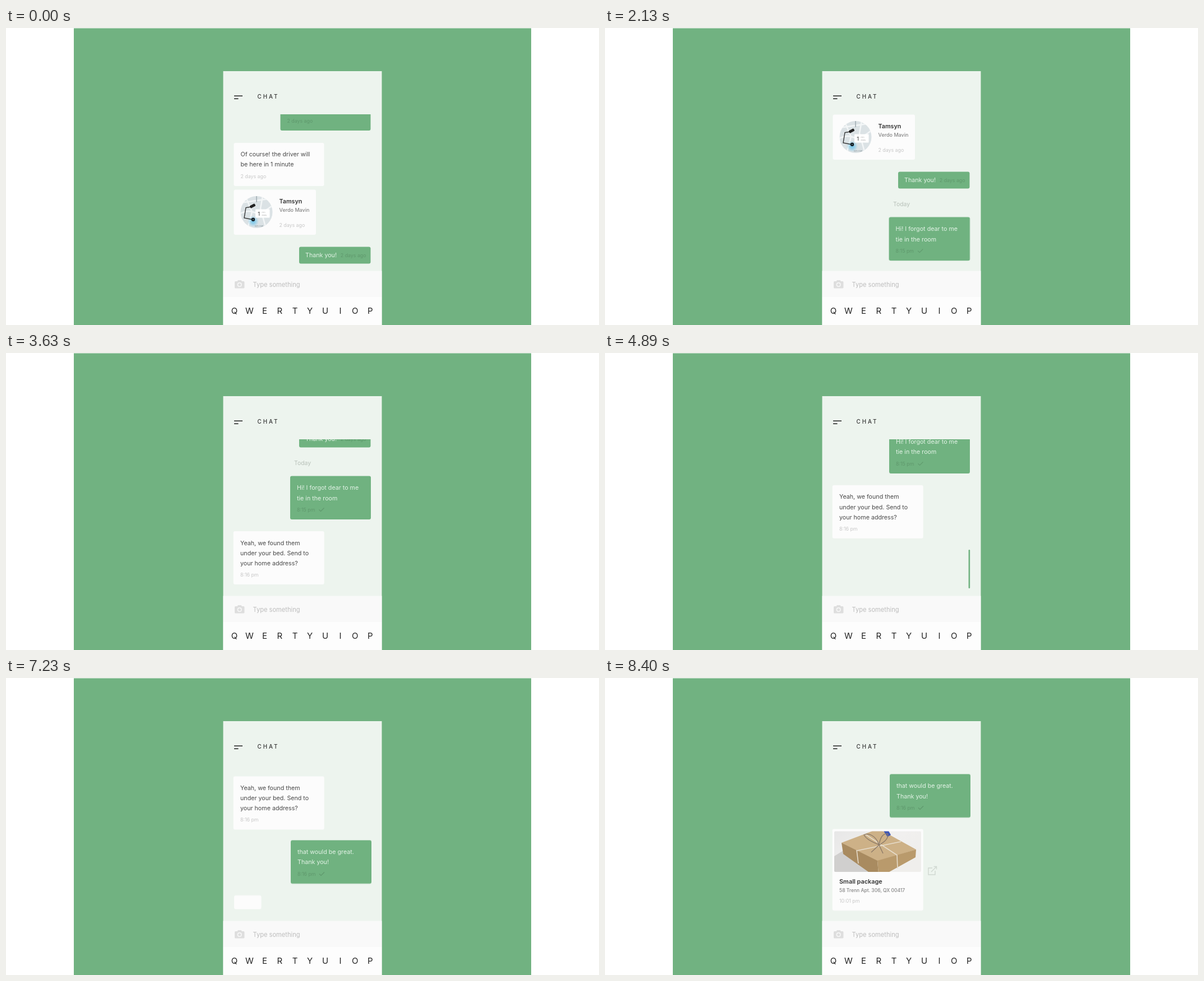
Write an HTML page that moves like this. It is 1058x530 px and loops after 9.39 s.

```html
<!DOCTYPE html>
<html lang="en">
<head>
<meta charset="utf-8">
<title>Chat</title>
<style>
html, body { margin: 0; width: 100%; height: 100%; overflow: hidden; background: #fff; }
svg { display: block; width: 100%; height: 100%; font: 10.7px Inter, "Open Sans", sans-serif; }
.green { fill: #70b280; }
.white { fill: #fcfcfc; }
.body { fill: #484848; }
.light { fill: #e3f3e6; }
.bold { fill: #333; font-weight: 600; }
.sub { fill: #858585; font-size: 9px; font-weight: 500; }
.time { fill: #c8c8c8; font-size: 8.8px; }
.sent { fill: #5f986c; font-size: 8.8px; }
.tick { fill: none; stroke: #5f986c; stroke-width: 1.1; }
.today { fill: #b8c1b9; font-size: 10.4px; }
.keys { fill: #222; font-size: 15px; text-anchor: middle; }

/* One shared 9390 ms loop; percentages are milliseconds / 93.9 */
.feed, .blob, .shift, .grow, .fade, .reply { animation: 9390ms linear infinite; }
.feed { animation-name: scroll; animation-timing-function: cubic-bezier(.65, 0, .35, 1); }
@keyframes scroll {
  0%, 12.705% { transform: translateY(0); }
  16.699% { transform: translateY(-104px); }
  20.692%, 24.601% { transform: translateY(-134px); }
  28.435%, 33.546% { transform: translateY(-178.5px); }
  37.7%, 49.361% { transform: translateY(-252px); }
  53.355%, 69.01% { transform: translateY(-346.5px); }
  72.843%, 76.997% { transform: translateY(-394.5px); }
  80.99%, 100% { transform: translateY(-512.5px); }
}

/* The send dot swells, rises and narrows to a bar */
.blob { fill: #70b280; animation-timing-function: ease-in-out; }
.blob.one { animation-name: blob-one; }
.blob.two { animation-name: blob-two; }
@keyframes blob-one {
  0%, 5.112% { x: 650px; y: 457px; width: 0; height: 0; rx: 16px; opacity: 1; }
  8.307%, 11.715% { x: 634px; y: 441px; width: 32px; height: 32px; rx: 16px; }
  15.335% { x: 647.7px; y: 361px; width: 4.3px; height: 66px; rx: 2px; }
  15.655% { x: 648.6px; y: 353px; width: 2.6px; height: 69px; rx: 1.3px; opacity: 1; }
  15.656%, 100% { x: 648.6px; y: 353px; width: 2.6px; height: 69px; rx: 1.3px; opacity: 0; }
}
@keyframes blob-two {
  0%, 43.131% { x: 650px; y: 457px; width: 0; height: 0; rx: 16px; opacity: 1; }
  46.326%, 48.3% { x: 634px; y: 441px; width: 32px; height: 32px; rx: 16px; }
  52.077% { x: 648.6px; y: 351px; width: 2.6px; height: 69px; rx: 1.3px; }
  52.236% { x: 648.6px; y: 350px; width: 2.6px; height: 69px; rx: 1.3px; opacity: 1; }
  52.237%, 100% { x: 648.6px; y: 350px; width: 2.6px; height: 69px; rx: 1.3px; opacity: 0; }
}

/* The first sent bubble makes room for the date label */
.shift { animation-name: shift; animation-timing-function: cubic-bezier(.65, 0, .35, 1); }
@keyframes shift {
  0%, 16.699% { transform: translateY(-30px); }
  20.692%, 100% { transform: translateY(0); }
}

.grow { animation-timing-function: ease-in-out; }
.grow.one { transform-origin: 650px 510px; animation-name: grow-one; }
.grow.two { transform-origin: 650px 722.7px; animation-name: grow-two; }
@keyframes grow-one {
  0%, 15.655% { transform: scale(0); }
  15.656% { transform: scale(.018, .89); }
  17.785% { transform: scale(1.076, 1.06); }
  19.915% { transform: scale(.985, .99); }
  22.045% { transform: scale(1.004); }
  23.802%, 100% { transform: none; }
}
@keyframes grow-two {
  0%, 52.236% { transform: scale(0); }
  52.237% { transform: scale(.018, .89); }
  54.366% { transform: scale(1.076, 1.06); }
  56.496% { transform: scale(.985, .99); }
  58.626% { transform: scale(1.004); }
  60.383%, 100% { transform: none; }
}

/* A small typing bubble opens into the full reply */
.reply { animation-timing-function: cubic-bezier(.65, 0, .35, 1); }
.reply.one { animation-name: reply-one; }
.reply.two { animation-name: reply-two; }
@keyframes reply-one {
  0%, 24.601% { x: 407px; y: 569px; width: 48.5px; height: 24.5px; opacity: 0; }
  28.435%, 33.546% { x: 407px; y: 569px; width: 48.5px; height: 24.5px; opacity: 1; }
  37.7%, 100% { x: 405.7px; y: 570px; width: 162px; height: 95px; opacity: 1; }
}
@keyframes reply-two {
  0%, 69.01% { x: 407px; y: 782.5px; width: 48.5px; height: 24.5px; opacity: 0; }
  72.843%, 76.997% { x: 407px; y: 782.5px; width: 48.5px; height: 24.5px; opacity: 1; }
  80.99%, 100% { x: 405.7px; y: 782px; width: 162px; height: 145.5px; opacity: 1; }
}

.f-date { animation-name: f-date; }
.f-hi { animation-name: f-hi; }
.f-yeah { animation-name: f-yeah; }
.f-great { animation-name: f-great; }
.f-parcel { animation-name: f-parcel; }
.f-share { animation-name: f-share; }
@keyframes f-date { 0%, 17.57% { opacity: 0; } 20.692%, 100% { opacity: 1; } }
@keyframes f-hi { 0%, 17.25% { opacity: 0; } 19.7%, 100% { opacity: 1; } }
@keyframes f-yeah { 0%, 35.2% { opacity: 0; } 38.4%, 100% { opacity: 1; } }
@keyframes f-great { 0%, 53.83% { opacity: 0; } 56.28%, 100% { opacity: 1; } }
@keyframes f-parcel { 0%, 79.4% { opacity: 0; } 85%, 100% { opacity: 1; } }
@keyframes f-share { 0%, 83% { opacity: 0; } 86.9%, 100% { opacity: 1; } }
</style>
</head>
<body>
<svg viewBox="0 0 1058 530">
  <defs>
    <clipPath id="feedArea"><rect x="387" y="154" width="284" height="279.5"/></clipPath>
    <clipPath id="mapArea"><circle cx="447" cy="328.5" r="28.5"/></clipPath>
    <clipPath id="photoArea"><rect x="409" y="273.5" width="155" height="72.5" rx="2"/></clipPath>
    <linearGradient id="studio" x2="1" y2=".6">
      <stop stop-color="#e7e7e7"/><stop offset=".55" stop-color="#f1f0ef"/><stop offset="1" stop-color="#efeeec"/>
    </linearGradient>
    <radialGradient id="glow"><stop stop-color="#6cc3ea"/><stop offset="1" stop-color="#6cc3ea" stop-opacity="0"/></radialGradient>
  </defs>

  <rect x="121" y=".5" width="816" height="530" fill="#71b281"/>
  <rect x="387.5" y="77" width="283" height="453" fill="#edf4ee"/>
  <path d="M407 121.2h15M407 126.2h7.5" stroke="#222" stroke-width="1.5"/>
  <text x="448.5" y="126.4" font-size="9.8" font-weight="500" letter-spacing="3" fill="#333">CHAT</text>

  <g clip-path="url(#feedArea)">
    <g class="feed">
      <rect class="green" x="489.5" y="100" width="161" height="83" rx="3"/>
      <text class="sent" x="501.5" y="168.7">2 days ago</text>

      <rect class="white" x="406.5" y="205" width="161" height="77" rx="3"/>
      <text class="body" x="418.5" y="229">Of course! the driver will</text>
      <text class="body" x="418.5" y="247.2">be here in 1 minute</text>
      <text class="time" x="418.5" y="267.8">2 days ago</text>

      <rect class="white" x="406.5" y="288.5" width="146.5" height="80.5" rx="3"/>
      <g clip-path="url(#mapArea)">
        <rect x="418" y="300" width="58" height="58" fill="#dbe2e5"/>
        <path d="M418 331q14-7 25-2t32-12M427 300l12 28-8 30M458 300l-4 22 10 36M418 312l57-8" fill="none" stroke="#f3f6f7" stroke-width="2.5"/>
        <path d="M447 300v11" stroke="#aeb9be" stroke-width="2"/>
        <circle cx="441" cy="345" r="10" fill="url(#glow)"/>
        <path d="M438 319l-10 1.5-3 18.5 16 3" fill="none" stroke="#333" stroke-width="1.4"/>
        <rect x="435" y="315" width="10" height="5" rx="1.5" fill="#222" transform="rotate(-28 440 317.5)"/>
        <circle cx="441" cy="341.7" r="3.2" fill="#151c22"/>
        <circle cx="441" cy="341.7" r=".8" fill="#8cc"/>
        <text x="444" y="355" font-size="4" fill="#89969c">Elm row</text>
      </g>
      <rect x="445" y="323.5" width="25.5" height="15" rx="1" fill="#fff"/>
      <text x="449.3" y="334.5" font-size="9.5" fill="#333">1</text>
      <text x="456.5" y="330.3" font-size="3.5" fill="#aaa">min</text>
      <text x="456.5" y="334.6" font-size="3.5" fill="#aaa">away</text>
      <text class="bold" x="487.5" y="313.2">Tamsyn</text>
      <text class="sub" x="487.5" y="328.3">Verdo Mavin</text>
      <text class="time" x="487.5" y="354.8">2 days ago</text>

      <rect class="green" x="523" y="390.5" width="127.5" height="30" rx="3"/>
      <text class="light" x="534" y="409.2">Thank you!</text>
      <text class="sent" x="596.8" y="408.7">2 days ago</text>

      <text class="today fade f-date" x="514" y="452.4">Today</text>
      <g class="shift"><g class="grow one">
        <rect class="green" x="507" y="471.5" width="144" height="77.5" rx="3"/>
        <g class="fade f-hi">
          <text class="light" x="519" y="496.4">Hi! I forgot dear to me</text>
          <text class="light" x="519" y="514.5">tie in the room</text>
          <text class="sent" x="519" y="534.8">8:15 pm</text>
          <path class="tick" d="M558.5 531.5l3 3 6-6"/>
        </g>
      </g></g>

      <rect class="white reply one" rx="3"/>
      <g class="fade f-yeah">
        <text class="body" x="418" y="594.5">Yeah, we found them</text>
        <text class="body" x="418" y="612.7">under your bed. Send to</text>
        <text class="body" x="418" y="630.9">your home address?</text>
        <text class="time" x="418" y="651">8:16 pm</text>
      </g>

      <g class="grow two">
        <rect class="green" x="508" y="684" width="144" height="77.5" rx="3"/>
        <g class="fade f-great">
          <text class="light" x="520" y="708.8">that would be great.</text>
          <text class="light" x="520" y="727">Thank you!</text>
          <text class="sent" x="520" y="747.3">8:16 pm</text>
          <path class="tick" d="M559 744l3 3 6-6"/>
        </g>
      </g>

      <rect class="white reply two" rx="3"/>
      <g transform="translate(0 512.5)">
        <g class="fade f-parcel">
          <g clip-path="url(#photoArea)">
            <rect x="409" y="273" width="155" height="73" fill="url(#studio)"/>
            <path d="M409 318l16-10 65 38h-81z" fill="#d0cfce"/>
            <path d="M422 294l66-25 67 37-69 21z" fill="#cdb187"/>
            <path d="M422 294l64 32 2 24-18-4-45-32z" fill="#a98b60"/>
            <path d="M486 326l69-20-1 14-54 30h-12z" fill="#b99a6c"/>
            <path d="M497 273h9l4 7-6 3.5z" fill="#3f57b5"/>
            <path d="M450 308l78-16M449 307l3 24M463 278l58 38 1 24" fill="none" stroke="#e6dccb" stroke-width="1.6"/>
            <path d="M489 298c-6-18-20-22-27-18 5 9 17 13 27 18 2-15 8-21 15-20 3 8-6 15-15 20l-14 13M489 298l7 15" fill="none" stroke="#8d7b68" stroke-width="1.4"/>
          </g>
          <text class="bold" x="418" y="367" font-size="10.9">Small package</text>
          <text class="sub" x="418" y="381.7" style="font-size:8.5px">58 Trenn Apt. 306, QX 00417</text>
          <text class="time" x="418" y="400.8">10:01 pm</text>
        </g>
        <path class="fade f-share" d="M584 339h-7v12h12v-7M582 346l9.5-9.5M586.5 336.5h5v5" fill="none" stroke="#d0d8d1" stroke-width="1.4"/>
      </g>
    </g>
  </g>

  <rect x="387.5" y="433.5" width="283" height="46.5" fill="#f9f9f9"/>
  <rect x="387.5" y="480" width="283" height="50" fill="#fdfdfd"/>
  <path d="M409.5 452h3l1.6-2h5.2l1.6 2h3q1.5 0 1.5 1.5v9.5q0 1.500-1.500 1.500h-14.400q-1.500 0-1.500-1.500v-9.500q0-1.500 1.500-1.500z" fill="#dedede"/>
  <circle cx="416.700" cy="458" r="3.300" fill="#dedede" stroke="#f9f9f9" stroke-width="1.500"/>
  <text x="440.500" y="461.800" font-size="11.100" fill="#bdbdbd">Type something</text>
  <g class="keys">
    <text x="407.500" y="509.800">Q</text><text x="434.500" y="509.800">W</text>
    <text x="461.500" y="509.800">E</text><text x="488.300" y="509.800">R</text>
    <text x="515.500" y="509.800">T</text><text x="542" y="509.800">Y</text>
    <text x="569.500" y="509.800">U</text><text x="596.500" y="509.800">I</text>
    <text x="622.700" y="509.800">O</text><text x="649.700" y="509.800">P</text>
  </g>

  <rect class="blob one"/>
  <rect class="blob two"/>
</svg>
</body>
</html>
```
